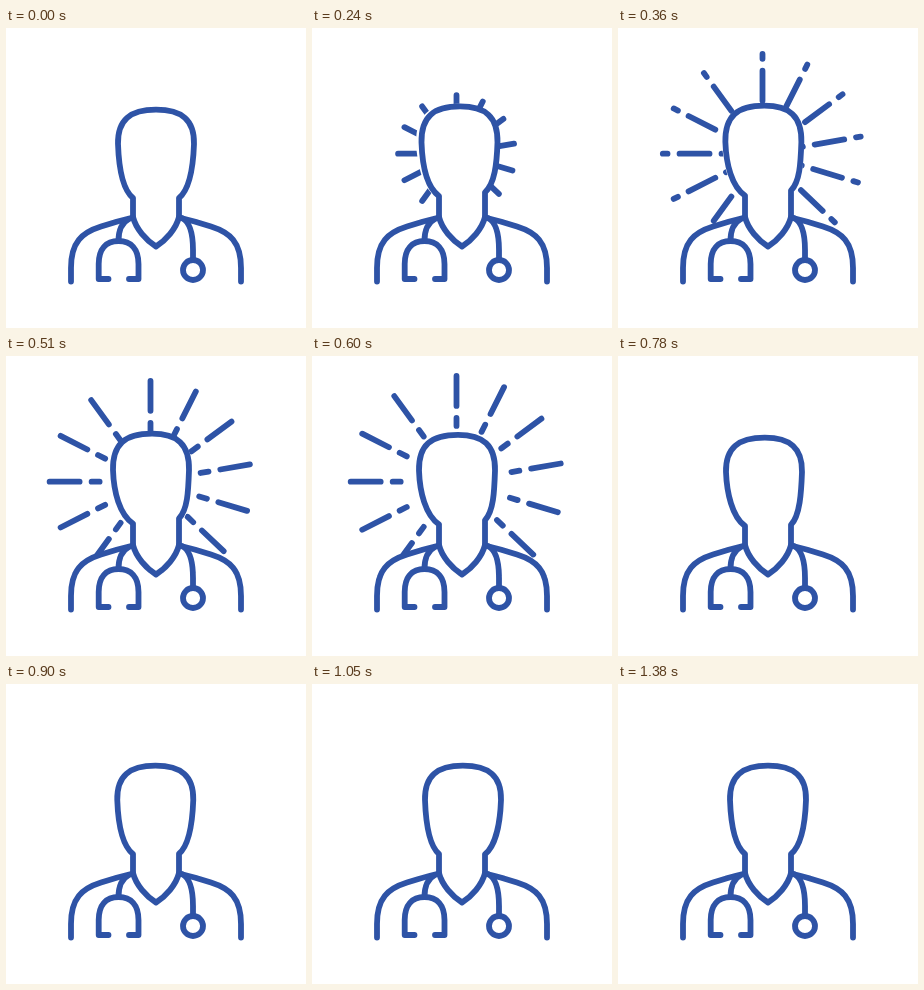
These frames come from a looping animation (300x300 px, 1.53 s). An HTML page:

```html
<!DOCTYPE html>
<html lang="en">
<head>
<meta charset="utf-8">
<title>Doctor</title>
<style>
  html, body { margin: 0; width: 100%; height: 100%; overflow: hidden; background: #fff; }
  svg { display: block; width: 100vw; height: 100vh; }
  path, line, circle { fill: none; stroke: #2e53a6; stroke-width: 5.8; stroke-linecap: round; stroke-linejoin: round; }
  .solid { fill: #fff; }
  #mask { fill: #fff; stroke: #fff; }
  #rays line { stroke-dasharray: 8 12 30 12; }
</style>
</head>
<body>
<svg viewBox="0 0 300 300">
  <g id="rays" transform="translate(144.5 125.7)"></g>
  <path id="mask"/>
  <!-- shoulders -->
  <path class="solid" d="M65 253.5V240C65 214 76 204.500 95 198.500Q112 193 127 189.500M173 189.500Q188 193 205 198.500C224 204.500 235 214 235 240V253.500"/>
  <path id="head" class="solid"/>
  <!-- collar -->
  <path class="solid" d="M127 189C130 201 140 212 150 218.500C160 212 170 201 173 189"/>
  <!-- stethoscope -->
  <path d="M123 191C115 195 112.500 203 112.500 213"/>
  <path d="M102.500 251H92.700V236C92.700 221 100 213 112.500 213S132.500 221 132.500 236V251H123"/>
  <path d="M176 190C184 194 187 207 187 222V232"/>
  <circle cx="187" cy="242" r="10"/>
</svg>
<script>
const LOOP = 1530, STEP = 30;
const byId = id => document.getElementById(id);

const progress = (t, from, to) => Math.min(1, Math.max(0, (t - from) / (to - from)));
const easeIn = (...span) => progress(...span) ** 2;
const easeOut = (...span) => 1 - (1 - progress(...span)) ** 3;
const easeInOut = (...span) => {
  const u = progress(...span);
  return u * u * (3 - 2 * u);
};

// The neck stays fixed while the upper head leans (dx) and lifts (dy).
function headPath(dx, dy) {
  const low = dx * .5, side = 116 + dy * .5, top = 81.7 + dy, corner = 92 + dy;
  const leftJaw = 170 + dy * .6, rightJaw = 170 + dy * 1.5 + dx * .3;
  return `M127 189V${leftJaw}C${116 + low} ${leftJaw - 9} ${112.7 + dx} 136 ${112 + dx} ${side}` +
    `C${111.5 + dx} ${corner} ${124 + dx} ${top} ${150 + dx * .8} ${top}` +
    `C${176 + dx} ${top} ${188.5 + dx} ${corner} ${188 + dx} ${side}` +
    `C${187.3 + dx} 136 ${184 + low} ${rightJaw - 9} 173 ${rightJaw}V189`;
}

function addRay(angle) {
  const ray = document.createElementNS('http://www.w3.org/2000/svg', 'line');
  ray.setAttribute('transform', `rotate(${angle})`);
  byId('rays').append(ray);
}
for (let i = 0; i < 6; i++) addRay(-90 + 26.7 * i);
for (let i = 0; i < 5; i++) addRay(126 + 27 * i);

byId('mask').setAttribute('d', headPath(-5, -3));

function draw(now) {
  const t = Math.floor(now % LOOP / STEP) * STEP;

  const lean = -5 * easeInOut(t, 60, 420) + 6 * easeInOut(t, 700, 1010) - easeInOut(t, 1050, 1380);
  const lift = -4 * easeInOut(t, 0, 330) + 4 * easeInOut(t, 500, 780);
  byId('head').setAttribute('d', headPath(lean, lift));

  // Dashes are measured from the inner end, so they travel outward with it.
  const start = 56 * easeInOut(t, 30, 620) + 60 * easeIn(t, 600, 760);
  const end = 106 * easeOut(t, 165, 485) + 9 * easeInOut(t, 500, 720);
  byId('rays').style.display = end > start ? '' : 'none';
  for (const ray of byId('rays').children) {
    ray.setAttribute('x1', start);
    ray.setAttribute('x2', end);
  }
}

const begin = performance.now();
function tick() {
  draw(performance.now() - begin);
  requestAnimationFrame(tick);
}
tick();
</script>
</body>
</html>
```
